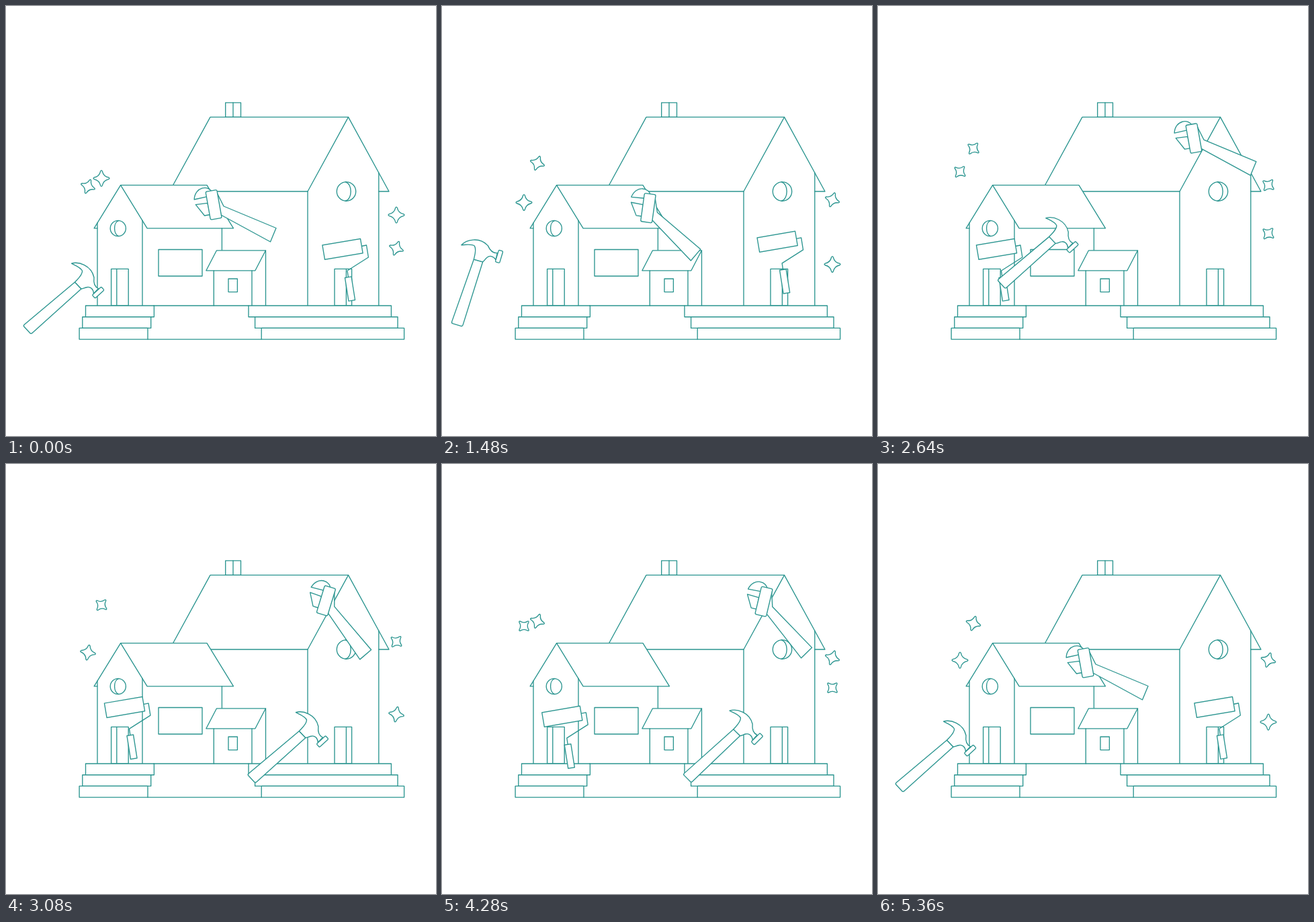
These frames come from a looping animation (640x640 px, 5.4 s). An HTML page with a canvas:

```html
<!DOCTYPE html>
<html lang="en">
<head>
<meta charset="utf-8">
<title>Home repair</title>
<style>
html, body { margin: 0; width: 100%; height: 100%; overflow: hidden; background: #fff; }
canvas { display: block; width: 100vmin; height: 100vmin; }
</style>
</head>
<body>
<canvas id="stage" width="640" height="640"></canvas>
<script>
const ctx = document.getElementById('stage').getContext('2d');
const LOOP = 5400, STEP = 40, TAU = 2 * Math.PI;
const GROUND = 446;

// ---- timing ----
const clamp = (v, lo, hi) => Math.min(hi, Math.max(lo, v));
const span = (t, a, b) => {
  const u = clamp((t - a) / (b - a), 0, 1);
  return u * u * (3 - 2 * u);
};
const hump = (t, a, b, c) => span(t, a, b) - span(t, b, c);
// Repeated 0-1-0 swing that stops after the given number of turns
const pulse = (t, from, period, turns) =>
  (1 - Math.cos(TAU * clamp((t - from) / period, 0, turns))) / 2;
const bowed = (u, dy, bow) => dy * u + bow * 4 * u * (1 - u);

// ---- drawing ----
function paint(path) {
  ctx.fill(path);
  ctx.stroke(path);
}
const draw = d => paint(new Path2D(d));
const line = d => ctx.stroke(new Path2D(d));
const box = (x, y, w, h) => draw(`M${x} ${y}h${w}v${h}h${-w}Z`);

function place(x, y, deg, content) {
  ctx.save();
  ctx.translate(x, y);
  ctx.rotate(deg * TAU / 360);
  content();
  ctx.restore();
}
function bar(x, y, w, h, deg, r = 0) {
  const p = new Path2D();
  p.roundRect(-w / 2, -h / 2, w, h, r);
  place(x, y, deg, () => paint(p));
}

// ---- scenery ----
// Gable front with its roof running sideways to the far ridge end
function home(x, y, ridge, half, drop, walls) {
  const dir = Math.sign(ridge), eave = y + drop, back = x - dir * half;
  draw(`M${x} ${y}h${ridge}l${dir * half} ${drop}h${-ridge}Z`);
  for (const w of walls) line(`M${w} ${y + Math.abs(w - x) / half * drop}V${GROUND}`);
  line(`M${x} ${y}L${back} ${eave}H${dir > 0 ? walls[0] : walls[1]}`);
}

function ring(x, y, r, side) {
  const p = new Path2D();
  p.arc(x, y, r, 0, TAU);
  paint(p);
  const top = x - side * 1.2, bulge = top + side * r * 0.74;
  line(`M${top} ${y - r}C${bulge} ${y - r * 0.8} ${bulge} ${y + r * 0.8} ${top} ${y + r}`);
}

function door(x, split) {
  box(x, 391.4, 25.6, GROUND - 391.4);
  line(`M${x + split} 391.4V${GROUND}`);
}

function steps(x, w, shift) {
  for (let i = 0; i < 3; i++) box(x + shift * i, GROUND + 16.7 * i, w, 16.7);
}

function drawScene() {
  box(326.7, 143.8, 22.8, 21.6);
  line('M338 143.8v21.6');
  home(509.5, 165.4, -205.5, 60.5, 110.6, [449, 554.8]);
  ring(506.5, 276, 14.2, 1);
  door(489, 17.4);

  home(170.6, 266.6, 128.4, 39.5, 64.2, [136, 203]);
  line(`M321.4 330.8V${GROUND - 82}`);
  ring(166.8, 331, 11.6, -1);
  door(156.6, 8.2);
  box(227, 362.5, 65, 39.5);

  draw('M313.5 363.8h73l-15.6 30h-73Z');
  line(`M309.3 393.8V${GROUND}M366 393.8V${GROUND}M386.5 363.8V${GROUND}`);
  box(331, 406, 13.4, 19.6);

  steps(118.5, 101.9, -4.7);
  steps(361, 212.4, 9.6);
  line(`M220 ${GROUND}H361M211 496.1H380`);
}

// ---- sparkles ----
function star(size) {
  const p = new Path2D(), tip = 10.7 * size, w = 1.3 * size, waist = 3 * size;
  for (let i = 0; i < 4; i++) {
    const c = Math.cos(i * TAU / 4), s = Math.sin(i * TAU / 4);
    const at = (x, y) => [x * c - y * s, x * s + y * c];
    p.lineTo(...at(-w, -tip));
    p.quadraticCurveTo(...at(0, -tip - 2.4 * size), ...at(w, -tip));
    p.quadraticCurveTo(...at(waist, -waist), ...at(tip, -w));
  }
  p.closePath();
  return p;
}

function drawStars(t) {
  const pair = (phase, x, mid, gap) => {
    const c = Math.cos(TAU * (t / 1920 + phase)), turn = (1 - c) / 2;
    const path = star(1 - 0.18 * turn);
    place(x, mid + 26 * c, 45 * turn, () => paint(path));
    place(581, mid + gap + 26 * c, 45 * turn, () => paint(path));
  };
  pair(0, 142, 230.5, 54.5);
  pair(0.237, 122, 266.5, 92);
}

// ---- tools ----
function drawRoller(t) {
  const back = span(t, 4380, 5300), u = span(t, 1760, 2620) - back;
  const slide = 16 * (pulse(t, 3060, 880, 1.5) * (1 - back) - pulse(t, 0, 880, 2));
  const x = -324.5 * u + slide * 0.165;
  const y = bowed(u, 0, back ? 0 : 39) + slide * 0.986;
  place(x, y, 0, () => {
    line('M529 357.5l7.5-1.5l2.9 18L508 394l1.4 9.4');
    bar(501, 361.9, 57.4, 21.7, -9.6);
    bar(512, 421, 9.7, 35.3, -9);
  });
}

function drawWrench(t) {
  const back = span(t, 4580, 5360), u = span(t, 2080, 2817) - back;
  const turn = 32 * (pulse(t, 440, 820, 2) + pulse(t, 2740, 920, 2));
  const [px, py] = t < 2400 ? [292.7, 291.4] : [309.2, 249.5];
  place(188.3 * u + px, bowed(u, -87.3, back ? -42 : -49) + py, turn, () => {
    ctx.translate(-px, -py);
    draw('M314 278L324 298L402 330.5L393.5 351L320 311Z');
    draw('M280.2 288C281 269 302 265.5 307 278L300 283.6Z');
    draw('M300 293.4L282.3 295.6L295.5 312L304 310.5Z');
    bar(309.1, 295.9, 17, 42.3, -10, 2);
  });
}

function drawHammer(t) {
  const back = span(t, 4660, 5360), u = span(t, 2240, 3090) - back;
  const s = t % 2400;
  const turn = -38 * hump(s, 820, 1420, 1650) - 18 * hump(s, 1650, 1760, 1980)
    + 6 * hump(s, 1420, 1650, 1650) + 6 * (s > 1650) * (1 - span(s, 2040, 2240));
  place(334 * u + 13, bowed(u, -13.4, back ? 0 : -62) + 495, turn, () => {
    ctx.translate(-13, -495);
    draw('M102.5 411L112 421L39 486.7Q37.2 488.3 35.7 486.7L26.9 477.2Q25.6 475.6 27.2 474.2Z');
    draw('M102.5 411C107 406 113.5 401 113.6 394.5C112 389.5 104 386.5 97.5 383.2' +
      'C108 380 127 386 131 404C130 412 132 418 137.5 420.5L130.5 428' +
      'C130 421 125.5 417.8 121 418.5C117 419 115 421 112 421Z');
    bar(137.2, 426.5, 18.2, 6.6, -42.6, 1.5);
  });
}

function frame(now) {
  const t = Math.floor(Math.max(0, now - start) % LOOP / STEP) * STEP;
  ctx.fillStyle = '#fff';
  ctx.fillRect(0, 0, 640, 640);
  ctx.strokeStyle = '#2b9590';
  ctx.lineWidth = 1.35;
  ctx.lineJoin = ctx.lineCap = 'round';
  drawScene();
  drawStars(t);
  drawRoller(t);
  drawWrench(t);
  drawHammer(t);
  requestAnimationFrame(() => frame(performance.now()));
}

const start = performance.now();
frame(start);
</script>
</body>
</html>
```
